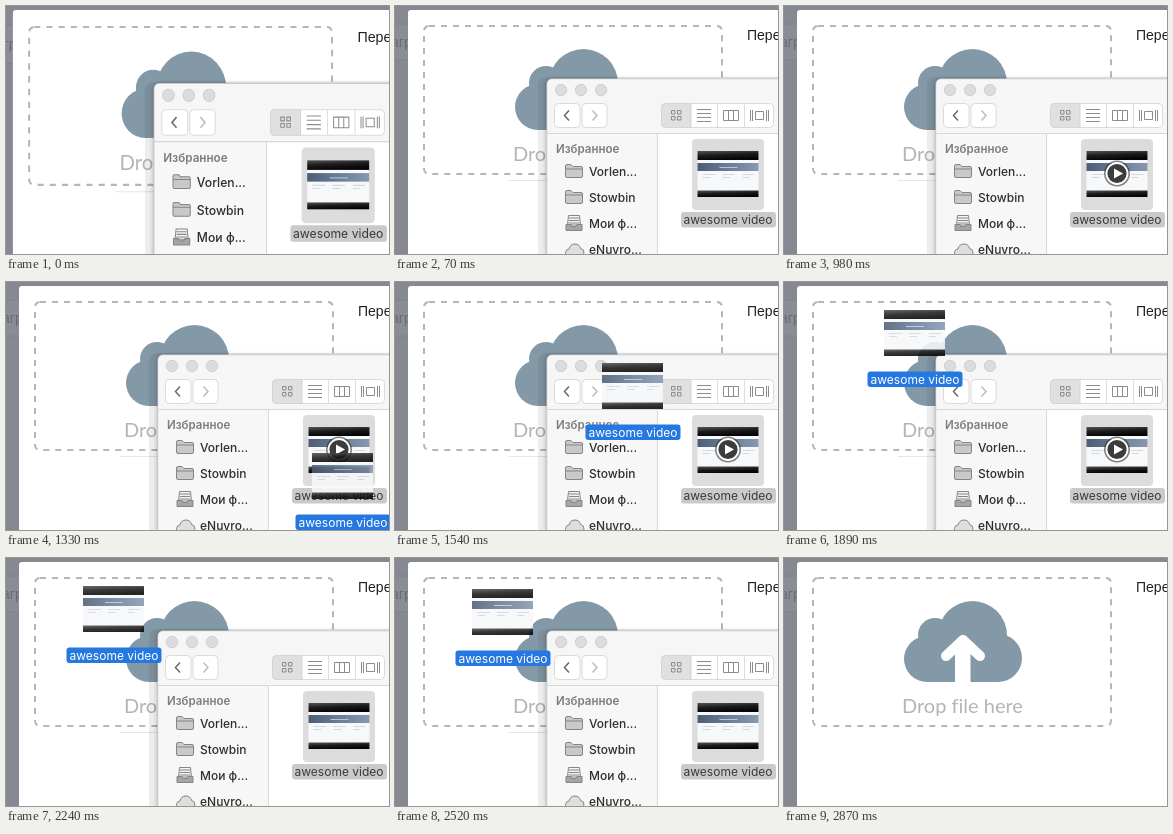
Recreate the animation shown at these times as an HTML page. Size 383 by 248 pixels, loop 3.57 s.

```html
<!DOCTYPE html>
<html lang="ru">
<head>
<meta charset="utf-8">
<title>Drop file here</title>
<style>
  html, body { margin: 0; width: 100%; height: 100%; overflow: hidden; background: #868991; }
  svg { display: block; width: 100vw; height: 100vh; }
  text { font: 12px Inter, sans-serif; white-space: pre; }
  .page { font: 14px "Liberation Sans", sans-serif; }
  .drop { font: 20px Lato, sans-serif; font-variant-ligatures: none; fill: #b5b5b5; }
  .heading { font-size: 11.5px; font-weight: 600; fill: #7c7c7c; }
  .row { fill: #2e2e2e; }
  .row text { font-weight: 500; }
  .button { fill: #fff; stroke: #dadada; }
  .icon { fill: none; stroke: #8c8c8c; }
  .side { fill: #c9c9c9; stroke: #858585; stroke-linejoin: round; }
</style>
</head>
<body>
<svg viewBox="0 0 383 248" preserveAspectRatio="none">
  <defs>
    <linearGradient id="bar" x2=".3" y2="1">
      <stop stop-color="#555"/><stop offset=".5" stop-color="#1c1c1c"/><stop offset="1" stop-color="#050505"/>
    </linearGradient>
    <linearGradient id="hero" x2="1" y2="0">
      <stop stop-color="#4d5d75"/><stop offset=".45" stop-color="#667a96"/><stop offset="1" stop-color="#8798b0"/>
    </linearGradient>
    <filter id="shadow" x="-20%" y="-20%" width="140%" height="140%">
      <feGaussianBlur stdDeviation="2"/>
    </filter>
    <g id="thumb">
      <rect width="61" height="46" fill="#f6f8fa"/>
      <rect width="61" height="9" fill="url(#bar)"/>
      <rect y="12" width="61" height="8" fill="url(#hero)"/>
      <path d="M22 16.5H40" stroke="#b9c5d6"/>
      <path d="M5 23.5H18M5 26.5H13M25 23.5H37M25 26.5H33M45 23.5H57M45 26.5H52" stroke="#d3d9e0"/>
      <rect y="39.500" width="61" height="6.500" fill="url(#bar)"/>
    </g>
    <path id="folder" class="side" d="M.5 2Q.5.5 2 .5H6L8 2.5H16Q17.5 2.5 17.5 4V12Q17.5 13.500 16 13.500H2Q.5 13.500.5 12ZM.5 5H17.500"/>
  </defs>

  <rect width="383" height="248" fill="#868991"/>
  <g id="scene">
    <rect x="-10" y="18" width="40" height="36" fill="#8a8d95" stroke="#7f828a"/>
    <text class="page" x="-4" y="41" fill="#686b73">агр</text>
    <rect x="13" y="4" width="400" height="270" rx="3" fill="#fff"/>
    <text class="page" x="352" y="34" fill="#222">Перетащите</text>
    <rect x="29" y="20" width="298" height="148" rx="5" fill="none" stroke="#b6b6b6" stroke-width="2" stroke-dasharray="6"/>

    <g fill="#8499a8">
      <circle cx="188.500" cy="77.500" r="34.500"/>
      <circle cx="151" cy="77" r="17"/>
      <circle cx="143" cy="101" r="23"/>
      <circle cx="214" cy="100" r="24"/>
      <rect x="143" y="80" width="71" height="44"/>
    </g>
    <path d="M162 98L179 82L196 98" fill="none" stroke="#fff" stroke-width="10" stroke-linecap="round" stroke-linejoin="round"/>
    <rect x="171" y="84" width="15.500" height="40" fill="#fff"/>
    <text class="drop" x="118" y="154.500">Drop file here</text>

    <g id="finder">
      <path d="M114 174.500H152" stroke="#e6e6e6"/>
      <rect x="143" y="71" width="270" height="215" rx="8" opacity=".07"/>
      <rect x="151" y="73" width="262" height="213" rx="6" opacity=".25" filter="url(#shadow)"/>
      <rect x="152" y="73" width="260" height="210" rx="5" fill="#fff" stroke="#cacaca"/>
      <path d="M152.500 127V78Q152.500 73.500 157 73.500H412V127Z" fill="#f6f6f6"/>
      <rect x="152.500" y="127" width="110" height="140" fill="#f7f7f7"/>
      <path d="M152 127.500H412M262.500 127V270" stroke="#d8d8d8"/>
      <g fill="#dcdcdc" stroke="#d0d0d0">
        <circle cx="166" cy="84" r="5.700"/><circle cx="186" cy="84" r="5.700"/><circle cx="206" cy="84" r="5.700"/>
      </g>

      <rect class="button" x="159.500" y="97.500" width="25.500" height="24" rx="4"/>
      <rect class="button" x="187" y="97.500" width="25" height="24" rx="4"/>
      <g fill="none" stroke-width="1.500">
        <path d="M174 104.500L169.500 109.500L174 114.500" stroke="#6a6a6a"/>
        <path d="M197.500 104.500L202 109.500L197.500 114.500" stroke="#bdbdbd"/>
      </g>
      <rect class="button" x="266.500" y="97.500" width="112" height="24" rx="4"/>
      <path d="M296 97.500H270.500Q266.500 97.500 266.500 101.500V117.500Q266.500 121.500 270.500 121.500H296Z" fill="#e0e0e0" stroke="#d5d5d5"/>
      <path d="M322.500 98V121M349.500 98V121" stroke="#dedede"/>
      <g class="icon">
        <path d="M276.500 104.500h3.500v3.500h-3.500zM282.500 104.500h3.500v3.500h-3.500zM276.500 110.500h3.500v3.500h-3.500zM282.500 110.500h3.500v3.500h-3.500z"/>
        <path d="M302 103.500H316M302 107.500H316M302 111.500H316M302 115.500H316"/>
        <path d="M328.500 104.500H343.500V114.500H328.500ZM333.500 104.500V114.500M338.500 104.500V114.500"/>
        <path d="M360.500 105.500H368.500V113.500H360.500ZM355.500 104V115M357.500 104V115M371.500 104V115M373.500 104V115"/>
      </g>

      <text class="heading" x="161" y="147">Избранное</text>
      <use href="#folder" x="170" y="158"/>
      <use href="#folder" x="170" y="184"/>
      <g class="side">
        <path d="M173.500 209.500H184.500L185.500 219H172.500Z" fill="#f4f4f4"/>
        <path d="M174 212H184M174 214.500H184M173.500 217H184.500" fill="none"/>
        <path d="M171 218.500H176L177 220.500H181L182 218.500H187V224.500H171Z" fill="#a5a5a5"/>
        <path d="M174 251Q170 250 170.500 246.500Q171 243 174 243Q175 238 180 238Q184.500 238 185.500 242.500Q189 243 189 247Q189 250 185 251Z" fill="#dedede"/>
      </g>
      <g class="row">
        <text x="194" y="170">Vorlen...</text>
        <text x="194" y="196">Stowbin</text>
        <text x="194" y="222">Мои ф...</text>
        <text x="194" y="248">eNuvro...</text>
      </g>

      <rect x="297" y="133" width="72" height="71" rx="4" fill="#dcdcdc"/>
      <use href="#thumb" x="302.500" y="145"/>
      <rect x="286" y="206" width="95" height="15.500" rx="3" fill="#cacaca"/>
      <text x="333" y="218" text-anchor="middle" fill="#3a3a3a">awesome video</text>
      <g id="play">
        <circle cx="333" cy="167.500" r="13" fill="#333" opacity=".6"/>
        <circle cx="333" cy="167.500" r="10.500" fill="#3c3c3c" stroke="#fff" stroke-width="1.800"/>
        <path d="M330 162.500L339 167.500L330 172.500Z" fill="#fff"/>
      </g>
    </g>

    <g id="ghost">
      <use href="#thumb" opacity=".87"/>
      <rect x="-16.500" y="61.500" width="95" height="15.500" rx="3" fill="#2578e0"/>
      <text x="31" y="73.500" text-anchor="middle" fill="#fff">awesome video</text>
    </g>
  </g>
</svg>
<script>
  const LOOP = 3570, STEP = 70, DRAG_START = 1330, DROP = 2870;
  const [scene, finder, play, ghost] =
    ["scene", "finder", "play", "ghost"].map(id => document.getElementById(id));

  // Position of the dragged thumbnail, one point per step
  const dragPath = [
    [306, 171], [275, 139], [240, 108], [207, 81], [178, 63], [152, 49], [131, 39], [114, 31],
    [100, 28], [92, 27], [86, 27], [81, 27], [78, 27], [77, 28], [77, 29], [77, 30], [77, 30], [77, 31]
  ];

  const show = (node, visible) => node.setAttribute("visibility", visible ? "visible" : "hidden");

  function draw(t) {
    const zoomed = t < STEP;
    scene.setAttribute("transform",
      zoomed ? "translate(383 4) scale(1.0165 1.066) translate(-383 -4)" : "");

    const open = t < DROP;
    finder.setAttribute("display", open ? "inline" : "none");
    show(play, open && t >= 980 && t < 2030);

    const dragging = open && t >= DRAG_START;
    show(ghost, dragging);
    if (dragging) {
      const step = Math.min(Math.floor((t - DRAG_START) / STEP), dragPath.length - 1);
      ghost.setAttribute("transform", `translate(${dragPath[step]})`);
    }
  }

  const start = performance.now();
  function tick() {
    draw((performance.now() - start) % LOOP);
    requestAnimationFrame(tick);
  }
  tick();
</script>
</body>
</html>
```
